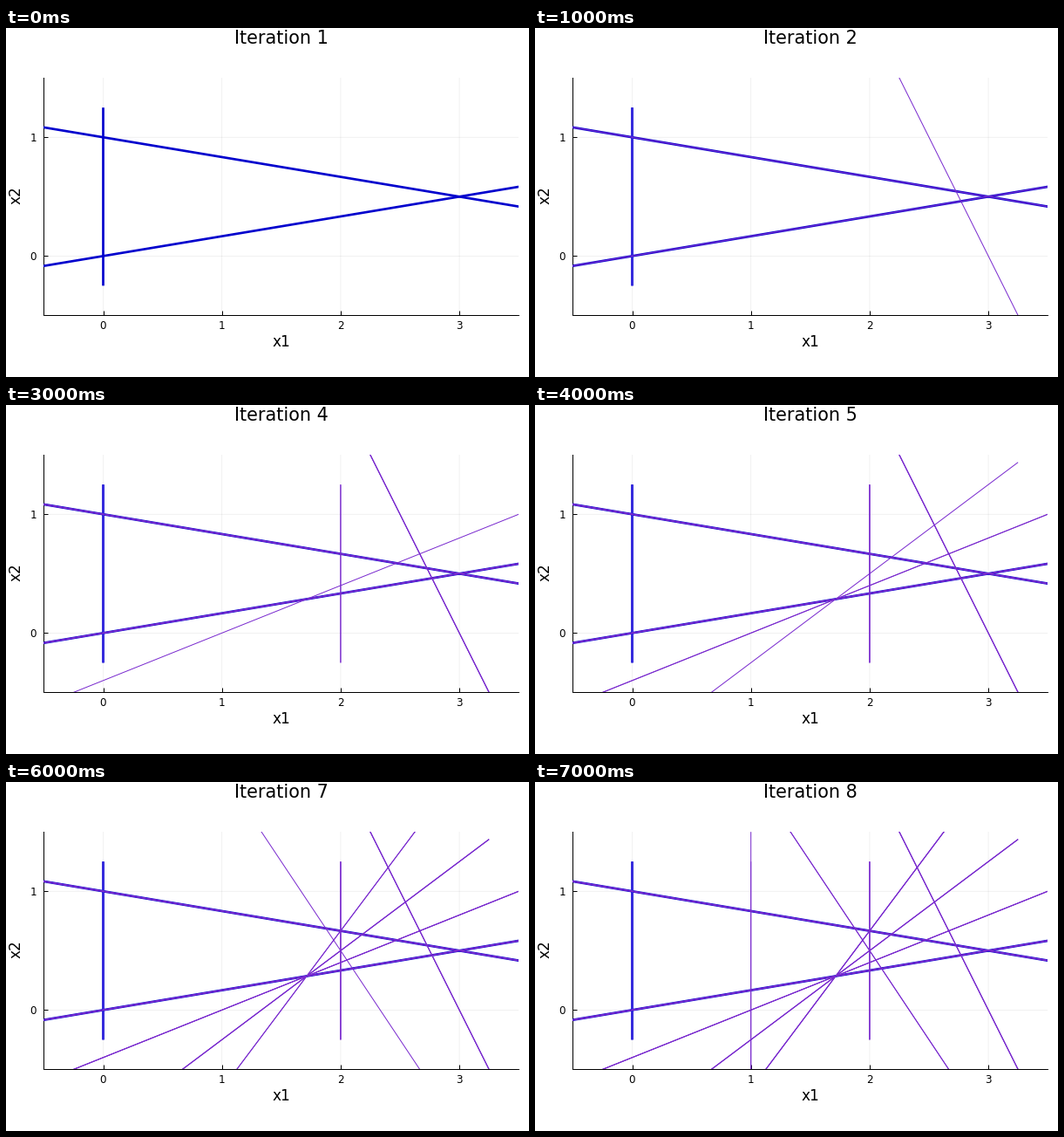
Recreate the animation shown at these times as a matplotlib script. Size 600 px wide and 400 px high, loop 8 s.

```python
import matplotlib.pyplot as plt
from matplotlib.animation import FuncAnimation

W, H, DPI = 600, 400, 100
LEFT, RIGHT, TOP, BOTTOM = 43.4, 588.2, 57.2, 329.4
BLUE, VIOLET, PURPLE = "#0000cd", "#3c2de0", "#7a2bcf"
PT = 72 / DPI  # points per pixel

plt.rcParams["font.family"] = "DejaVu Sans"
fig = plt.figure(figsize=(W / DPI, H / DPI), dpi=DPI, facecolor="white")
ax = fig.add_axes([LEFT / W, 1 - BOTTOM / H,
                   (RIGHT - LEFT) / W, (BOTTOM - TOP) / H])
ax.set(xlim=(-0.5, 3.5), ylim=(-0.5, 1.5),
       xticks=range(4), yticks=range(2))
ax.set_axisbelow(True)
ax.grid(color="black", alpha=0.08, lw=0.5, snap=False)
ax.spines[["top", "right"]].set_visible(False)
for side in ("left", "bottom"):
    ax.spines[side].set_linewidth(1 * PT)
    ax.spines[side].set_zorder(1)
ax.tick_params(direction="in", length=5 * PT, width=1 * PT, labelsize=12 * PT)
ax.tick_params(axis="x", pad=5.8 * PT)
ax.tick_params(axis="y", pad=8.5 * PT)


def label(x, y, text, px, **kw):
    return fig.text(x / W, 1 - y / H, text, fontsize=px * PT, ha="center", **kw)


label(316.3, 365.4, "x1", 17, va="baseline")
label(11.7, 192, "x2", 17, va="center", rotation=90)
title = label(316.2, 18, "Iteration 1", 20.8, va="baseline")


def sloped(slope, offset, x0=-0.75, x1=3.75):
    return (x0, x1), (slope * x0 + offset, slope * x1 + offset)


def upright(x, y0=-0.25, y1=1.25):
    return (x, x), (y0, y1)


SLOPES = [sloped(-1 / 6, 1), sloped(1 / 6, 0)]
WALL = upright(0)
CUTS = [  # one more cut per iteration, from the second on
    sloped(-2, 6),
    upright(2),
    sloped(0.4, -0.4),
    sloped(0.75, -1, x1=3.25),
    sloped(4 / 3, -2),
    sloped(-1.5, 3.5),
    upright(1, -0.5, 1.5),
]
layers = []  # (first iteration, line)


def stroke(first, path, color, px, order):
    line, = ax.plot(*path, color=color, lw=px * PT, zorder=order,
                    solid_capstyle="butt", snap=False)
    layers.append((first, line))


def restroke(first, path, px, order):
    """Repeated strokes make older lines heavier."""
    for n in range(first, min(first + 3, 9)):
        stroke(n, path, PURPLE, px, order)


for path in SLOPES + [WALL]:
    stroke(1, path, BLUE, 2.7, 3)
stroke(2, WALL, VIOLET, 2, 4)
for path in SLOPES:
    restroke(2, path, 1.2, 4)
for k, cut in enumerate(CUTS, start=2):
    restroke(k, cut, 1, 6)
stroke(8, upright(1, -0.5, 1.25), PURPLE, 1, 6)


def draw(frame):
    n = frame + 1
    title.set_text(f"Iteration {n}")
    for first, line in layers:
        line.set_visible(first <= n)
    return [title] + [line for _, line in layers]


anim = FuncAnimation(fig, draw, frames=8, interval=1000,
                     repeat=True, repeat_delay=0, blit=False)
plt.show()
```
